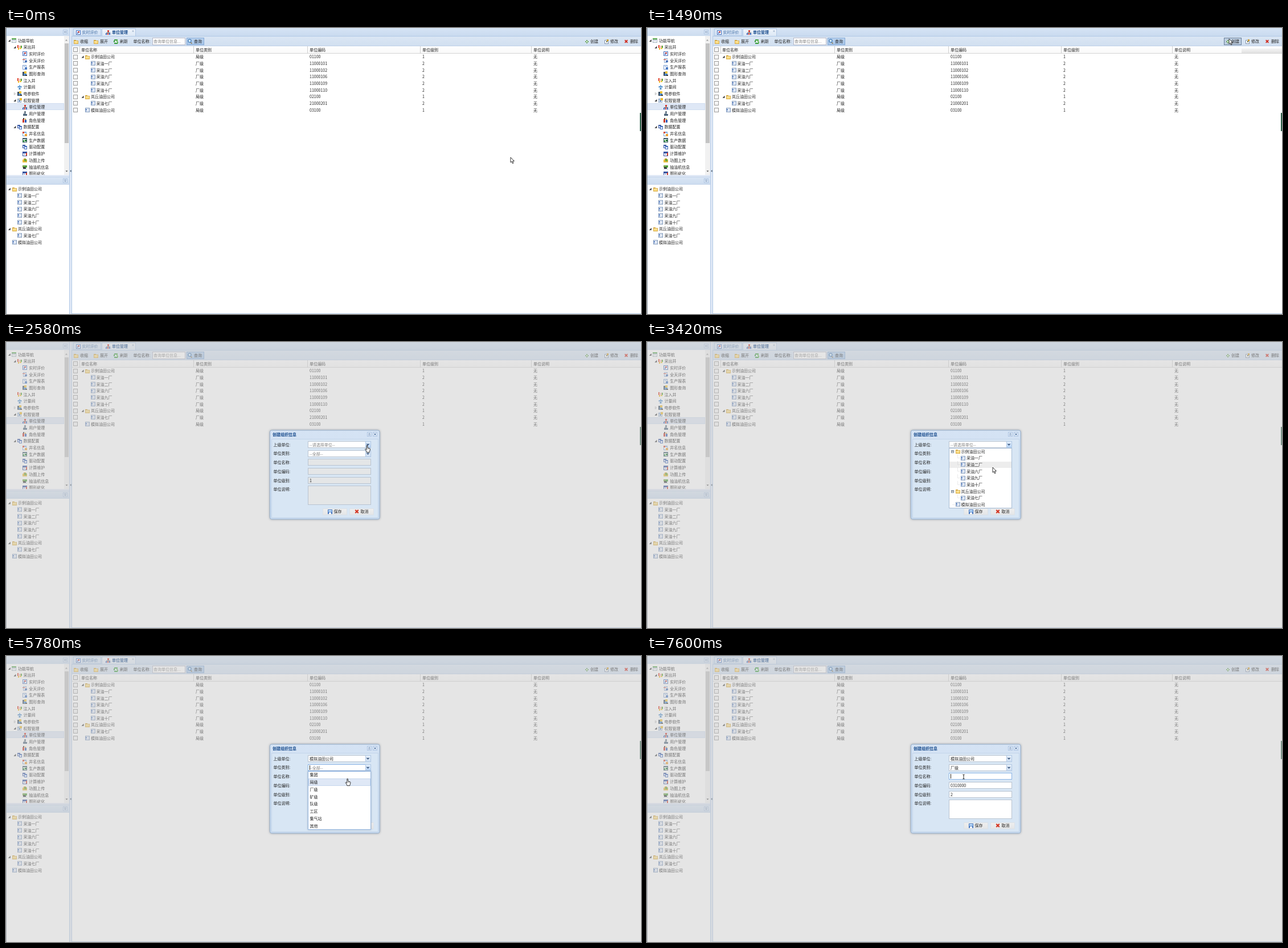
Write an HTML page with a canvas that moves like this. It is 1115 px wide and 502 px high and loops after 8 s.

```html
<!DOCTYPE html>
<html lang="zh-CN">
<head>
<meta charset="utf-8">
<title>单位管理</title>
<style>
html, body { margin: 0; width: 100%; height: 100%; overflow: hidden; background: #fff; }
canvas { display: block; width: 1115px; height: 502px; }
</style>
</head>
<body>
<canvas id="stage" width="1115" height="502"></canvas>
<script>
const W = 1115, H = 502, LOOP = 8000, ROW = 11.68;
const g = document.getElementById('stage').getContext('2d');
const FONT = '"Noto Sans CJK SC", "Noto Sans CJK JP", "Noto Sans CJK", sans-serif';
const INK = '#222', BLUE = '#15498b', LINE = '#b3cae6';

// Each icon: "colour x y w h" blocks on an 8 x 8 grid.
const ICONS = {
  nav: '#9fb0bb 0 0 8 8;#fff 1 3 6 4;#58ab4e 0 0 8 2;#a9b9c5 2 4 4 1',
  well: '#e03a22 0 0 2 5;#f3b51b 1 5 2 3;#dd4b25 4 1 1 4;#4ea22c 6 1 2 4;#f2cf34 4 5 3 2',
  live: '#4a72bb 0 0 8 8;#eef4ff 1 1 6 6;#d23a2f 3 2 3 2;#4773ca 2 4 2 2',
  day: '#8eaad0 1 0 6 8;#fff 2 1 4 6;#d44535 0 2 5 1;#4d74bb 4 4 4 3',
  report: '#7f9fd0 0 0 7 8;#fff 1 1 5 6;#78a7e3 2 2 3 1;#4a7ac5 4 4 4 4',
  query: '#3b4d5e 0 1 5 7;#f3c338 3 0 4 4;#4d91d6 2 4 5 3;#333 5 6 3 2',
  house: '#7db3df 3 0 2 2;#69a3d8 1 2 6 2;#4c88c7 0 3 8 1;#c9e4f8 1 4 6 4;#4784bd 3 5 2 3',
  right: '#8ba6c7 0 1 7 7;#fff 1 3 5 4;#ecbb30 4 0 4 4;#3f70b4 2 4 3 2',
  org: '#d63a2f 3 0 3 3;#666 4 3 1 2;#666 1 4 7 1;#3c62b8 0 5 2 3;#d63a2f 3 5 2 3;#3c62b8 6 5 2 3',
  user: '#6f7f8d 3 0 3 3;#8797a5 2 3 4 2;#4a637a 1 5 7 3',
  role: '#333 1 0 2 2;#c8392c 0 2 3 6;#e1b13a 4 1 2 2;#2f5ab4 4 3 3 5',
  config: '#3a59a3 0 0 5 6;#d9e6fb 1 2 3 3;#3f69bb 3 2 5 6;#eef4ff 4 4 3 3',
  name: '#7aa6da 0 0 7 8;#fff 1 2 5 5;#dc4b30 0 0 3 3;#f0a233 4 4 4 4',
  data: '#3b5869 0 0 8 8;#e6f2e6 1 2 6 5;#3da347 1 4 2 3;#257a35 4 3 3 3',
  calc: '#3553a1 0 0 8 8;#fff 1 3 5 4;#cf3a2b 6 2 2 5;#7892c9 2 4 3 1',
  upload: '#e8bc3c 0 3 8 5;#d99f28 2 1 4 3;#6da737 3 2 4 4',
  pump: '#77a94a 0 1 8 4;#333 1 4 5 3;#3d9a3e 4 2 3 3;#b5c1c9 0 7 8 1',
  folder: '#cfa23a 0 1 4 2;#d9ad4a 0 2 8 6;#f9dc83 1 3 6 4;#fff0b8 1 3 6 1',
  leaf: '#849cbd 0 0 8 8;#f7faff 1 1 6 6;#4a74bb 1 2 2 2;#a9bcd8 4 2 3 1;#4a74bb 1 5 2 1;#a9bcd8 4 5 3 1',
  fresh: '#3a9c3c 1 0 6 2;#3a9c3c 0 2 2 3;#66b956 5 1 2 3;#3a9c3c 1 6 6 2;#66b956 6 4 2 3;#dff2d8 3 3 2 2',
  plus: '#6ea564 3 1 2 6;#6ea564 1 3 6 2;#e5f6dc 3 3 2 2',
  edit: '#8394ad 0 1 7 7;#fff 1 2 5 5;#d29c28 4 0 3 3;#4d5b36 3 3 2 2',
  save: '#4576bf 0 0 8 8;#b9d8f7 1 1 6 3;#f3f8ff 2 5 4 3'
};

const NAV = [
  [0, 'nav', '功能导航', 1], [1, 'well', '采出井', 1], [2, 'live', '实时评价'],
  [2, 'day', '全天评价'], [2, 'report', '生产报表'], [2, 'query', '图形查询'],
  [1, 'well', '注入井'], [1, 'house', '计量间'], [1, 'query', '电参软件', 2],
  [1, 'right', '权限管理', 1], [2, 'org', '单位管理'], [2, 'user', '用户管理'],
  [2, 'role', '角色管理'], [1, 'config', '数据配置', 1], [2, 'name', '井名信息'],
  [2, 'data', '生产数据'], [2, 'config', '驱动配置'], [2, 'calc', '计算维护'],
  [2, 'upload', '功图上传'], [2, 'pump', '抽油机信息'], [2, 'calc', '图形优化']
];
const UNITS = [
  [0, '示例油田公司', '01100', 1], [1, '采油一厂', '11000101'], [1, '采油二厂', '11000102'],
  [1, '采油六厂', '11000106'], [1, '采油九厂', '11000109'], [1, '采油十厂', '11000110'],
  [0, '岚丘油田公司', '02100', 1], [1, '采油七厂', '21000201'], [0, '模拟油田公司', '03100']
];
const KINDS = ['集团', '局级', '厂级', '矿级', '队级', '工区', '集气站', '其他'];

// Pointer moves: start, end, steps, target x, target y.
const MOVES = [
  [500, 1490, 8, 1022, 19], [1890, 2580, 6, 634, 181], [3420, 3420, 1, 607, 220],
  [3560, 4410, 7, 596, 284], [4560, 4950, 4, 632, 196], [5260, 6400, 9, 559, 239],
  [6800, 7450, 6, 556, 212]
];
const T = { press: 1490, dialog: 1610, tree: 2860, picked: 4560, kinds: 5260, chosen: 6800, focus: 7450 };

function rect(x, y, w, h, fill, stroke) {
  if (fill) { g.fillStyle = fill; g.fillRect(x, y, w, h); }
  if (stroke) { g.strokeStyle = stroke; g.lineWidth = 1; g.strokeRect(x + .5, y + .5, w - 1, h - 1); }
}
function fade(y, h, top, bottom) {
  const f = g.createLinearGradient(0, y, 0, y + h);
  f.addColorStop(0, top);
  f.addColorStop(1, bottom);
  return f;
}
function text(s, x, y, color = INK, bold = false) {
  g.font = (bold ? 'bold ' : '') + '7px ' + FONT;
  g.fillStyle = color;
  g.fillText(s, x, y + 2.6);
}
function icon(name, cx, cy) {
  const x = Math.round(cx - 4), y = Math.round(cy - 4);
  for (const part of ICONS[name].split(';')) {
    const [c, ...b] = part.split(' ');
    rect(x + +b[0], y + +b[1], +b[2], +b[3], c);
  }
}
function poly(points, fill, stroke, width = .8) {
  g.beginPath();
  points.forEach(([x, y]) => g.lineTo(x, y));
  g.closePath();
  if (fill) { g.fillStyle = fill; g.fill(); }
  if (stroke) { g.strokeStyle = stroke; g.lineWidth = width; g.stroke(); }
}
function line(points, color, width = 1) {
  g.beginPath();
  points.forEach(([x, y], i) => i ? g.lineTo(x, y) : g.moveTo(x, y));
  g.strokeStyle = color;
  g.lineWidth = width;
  g.stroke();
}
function cross(x, y, r, color, width) {
  line([[x - r, y - r], [x + r, y + r]], color, width);
  line([[x + r, y - r], [x - r, y + r]], color, width);
}
function expander(x, y, state) {
  if (state === 1) poly([[x + 2, y - 2], [x + 2, y + 2], [x - 2, y + 2]], '#333');
  if (state === 2) poly([[x - 1, y - 2], [x + 1.5, y], [x - 1, y + 2]], '#fff', '#999', .6);
}
function down(x, y, color, r = 2) {
  poly([[x - r, y - r / 2], [x + r, y - r / 2], [x, y + r / 2]], color);
}
function tool(x, y, angle) {
  rect(x - 4, y - 4, 8, 8, '#e3edf9', '#adc4e2');
  g.save();
  g.translate(x, y);
  g.rotate(angle);
  for (const d of [-1.7, .7]) line([[d + 1.3, -1.8], [d, 0], [d + 1.3, 1.8]], '#4a6d9c', .8);
  g.restore();
}

function sidebar() {
  rect(0, 0, 112, 14, fade(0, 14, '#dae6f5', '#ccdcef'));
  tool(104, 7, 0);
  rect(1, 132, 101, 12, '#dfe8f6', '#d0ddef');
  g.save();
  g.beginPath();
  g.rect(0, 14, 102, 244);
  g.clip();
  NAV.forEach(([level, pic, label, open], i) => {
    const y = 22 + i * ROW, x = level * 9.6;
    expander(5.8 + x, y, open);
    icon(pic, 14 + x, y);
    text(label, 21 + x, y);
  });
  g.restore();
  rect(102, 14, 9, 244, '#f1f1f1');
  rect(103, 27, 7, 175, '#c3c3c3');
  poly([[104, 22.5], [108, 22.5], [106, 20]], '#9a9a9a');
  down(106.5, 251.5, '#444');
  down(56, 257, '#555', 1.6);
  rect(0, 258, 112, 3, '#dfe8f6');
  rect(0, 261, 112, 14, fade(261, 14, '#dae6f5', '#ccdcef'), '#c2d3e9');
  tool(104, 268, -Math.PI / 2);
  UNITS.forEach(([level, label, , open], i) => {
    const y = 282.6 + i * ROW, x = level * 9.5;
    expander(5.8, y, open);
    icon(open ? 'folder' : 'leaf', 14.5 + x, y);
    text(label, 21 + x, y);
  });
  rect(0, 0, 1, H, '#8d9ba8');
  rect(111, 0, 1, H, LINE);
  rect(112, 0, 3, H, '#dfe8f6');
  poly([[114.5, 249], [114.5, 253], [112.3, 251]], '#456');
}

function toolbar(pressed) {
  rect(115, 15, 1000, 17, fade(15, 17, '#dae6f4', '#d1dff0'));
  rect(115, 31, 1000, 1, '#bfd1e8');
  icon('folder', 123, 23.5);
  text('收缩', 130, 23.5);
  icon('folder', 157.5, 23.5);
  text('展开', 165, 23.5);
  icon('fresh', 193, 23.5);
  text('刷新', 200, 23.5);
  text('单位名称:', 223.5, 23.5);
  rect(257, 17, 58, 13, '#fff', '#b5b8c8');
  text('查询单位信息...', 259, 23.5, '#858585');
  rect(317, 17, 31, 13, fade(17, 13, '#bcd4ef', '#a5c4e8'), '#82a8d6');
  line([[324, 25], [326.5, 27.5]], '#8c7140', 1.3);
  g.beginPath();
  g.arc(322.5, 22.5, 2.6, 0, 7);
  g.fillStyle = '#d8eeff';
  g.fill();
  g.strokeStyle = '#487fb9';
  g.stroke();
  text('查询', 330, 23.5);
  if (pressed) rect(1013, 17, 31, 13, '#bdcde0', '#687f9b');
  icon('plus', 1019.5, 24);
  text('创建', 1026, 23.5);
  icon('edit', 1054.5, 23.5);
  text('修改', 1061, 23.5);
  cross(1089, 23.5, 2.3, '#d02a1c', 1.8);
  text('删除', 1096, 23.5);
}

function checkbox(y) {
  rect(118, Math.round(y - 4), 8, 8, '#f6f6f6', '#9b9b9b');
}

function grid(pressed) {
  rect(115, 0, 1000, 14, fade(0, 14, '#d6e4f5', '#c9daef'));
  rect(118, 1, 49, 13, fade(1, 13, '#dfeaf8', '#cfdff3'), '#b0c8e6');
  rect(168, 1, 60, 14, fade(1, 14, '#f1f6fd', '#dae6f4'), '#b0c8e6');
  rect(115, 14, 53, 1, LINE);
  rect(228, 14, 887, 1, LINE);
  icon('live', 127, 7.5);
  text('实时评价', 133.5, 7.5, '#416da3');
  icon('org', 179, 7.5);
  text('单位管理', 186, 7.5, BLUE, true);
  cross(223, 5.5, 1.4, '#8199b7', .8);
  toolbar(pressed);
  rect(115, 32, 1000, 13, fade(32, 13, '#fff', '#f8f8f8'));
  if (pressed) rect(1044, 36, 71, 9, fade(36, 9, '#f4f4f4', '#dfdfdf'));
  rect(115, 44, 1000, 1, '#d5d5d5');
  [129, 329, 529, 727, 922].forEach(x => rect(x, 32, 1, 13, '#cfcfcf'));
  const cols = [132, 333, 533, 731, 926];
  ['名称', '类别', '编码', '级别', '说明'].forEach((s, i) => text('单位' + s, cols[i], 38));
  checkbox(38);
  UNITS.forEach(([level, label, code, open], i) => {
    const y = 50.6 + i * ROW, x = level * 9.6;
    checkbox(y);
    expander(134.5, y, open);
    icon(open ? 'folder' : 'leaf', 143 + x, y);
    text(label, 149 + x, y);
    [level ? '厂级' : '局级', code, level + 1, '无'].forEach((s, j) => text(s, cols[j + 1], y));
  });
  rect(115, 15, 1, H - 15, LINE);
  rect(115, 501, 1000, 1, LINE);
  rect(1113, 149, 2, 32, '#2e6149');
}

function field(y, h, value, { dull, hint, combo, hot, focus } = {}) {
  rect(530, y, 111, h, dull ? '#e4e6e7' : '#fff', focus ? '#8ab4e6' : '#b9c4d1');
  if (value) text(value, 533, y + 6.3, hint ? '#808080' : INK);
  if (combo) {
    rect(631, y, 10, h, fade(y, h, '#eaf2fb', hot ? '#afcff5' : '#cbdcf0'), '#b0c7e3');
    line([[633.5, y + 4.8], [635.5, y + 6.8], [637.5, y + 4.8]], '#2c4a74', 1.4);
  }
  if (focus) rect(533, y + 2, 1, h - 4, '#222');
}

function button(x, label) {
  rect(x, 292, 43, 12, fade(292, 12, '#efefef', '#e3e5e7'), '#dbe1e7');
  text(label, x + 19.5, 297.8);
}

function treeList(py) {
  rect(530, 186, 111, 106, '#fff', '#a9bdd5');
  UNITS.forEach(([level, label, , open], i) => {
    const y = 192 + i * ROW, x = level * 9.5;
    if (py >= y - 5.2 && py < y + 6.5) rect(531, Math.round(y - 5.5), 109, 11, '#ededed');
    g.setLineDash([1, 1]);
    if (level) line([[545.5, y - 6], [545.5, y], [550, y]], '#c3c3c3', .7);
    else line([[536.5, y], [541, y]], '#c3c3c3', .7);
    g.setLineDash([]);
    if (open) {
      rect(534, Math.round(y - 2.5), 5, 5, '#fff', '#8294a9');
      line([[535, y], [538, y]], '#333', .8);
    }
    icon(open ? 'folder' : 'leaf', 545.5 + x, y);
    text(label, 551.5 + x, y);
  });
}

function kindList(py) {
  g.save();
  g.shadowColor = 'rgba(60,80,110,.4)';
  g.shadowBlur = 3;
  rect(530, 202, 111, 103, '#fff');
  g.restore();
  rect(530, 202, 111, 103, null, '#98b9e2');
  KINDS.forEach((s, i) => {
    const y = 208.5 + i * 12.8;
    if (py >= y - 6.4 && py < y + 6.4) rect(531, Math.round(y - 6.4), 109, 13, '#dfe8f6', '#c6d6ec');
    text(s, 533.5, y);
  });
}

function dialog(t, p) {
  g.save();
  g.shadowColor = 'rgba(60,75,95,.6)';
  g.shadowBlur = 4;
  g.beginPath();
  g.roundRect(463.5, 155, 192.5, 156, 3);
  g.fillStyle = fade(155, 157, '#d5e3f4', '#c9dbef');
  g.fill();
  g.restore();
  g.strokeStyle = '#9ab3d0';
  g.lineWidth = 1;
  g.stroke();
  rect(466, 170, 188, 139, '#d8e6f4', '#c3d5ea');
  text('创建组织信息', 468, 162.3, BLUE, true);
  tool(638, 162, Math.PI / 2);
  rect(644, 158, 8, 8, '#e3edf9', '#adc4e2');
  cross(648, 162, 1.7, '#4a6d9c', 1);
  ['上级单位', '单位类别', '单位名称', '单位编码', '单位级别', '单位说明']
    .forEach((s, i) => text(s + ':', 469.5, 180 + i * 15.75));

  const picked = t >= T.picked, chosen = t >= T.chosen;
  const listing = t >= T.kinds && !chosen;
  const dullTop = t < 1890, dull = t < T.tree;
  field(174, 12, picked ? UNITS[8][1] : '--请选择单位--',
    { combo: true, hint: !picked, dull: dullTop, hot: t >= 2580 && t < T.picked });
  field(190, 12, chosen ? KINDS[2] : '--全部--',
    { combo: true, hint: !chosen, dull: dullTop, hot: t >= 4950 && !chosen, focus: listing });
  field(205, 12, '', { dull, focus: t >= T.focus });
  field(221, 12, chosen ? '0310000' : '', { dull });
  field(237, 12, chosen ? '2' : '1', { dull });
  field(252, 34, '', { dull });
  button(556, '保存');
  icon('save', 568.5, 297.5);
  button(603, '取消');
  cross(616, 297.5, 2.7, '#d43522', 2.2);
  if (t >= T.tree && !picked) treeList(p.y);
  if (listing) kindList(p.y);
}

function pointer(t) {
  let x = 886, y = 227;
  for (const [a, b, n, tx, ty] of MOVES) {
    if (t < a) break;
    const i = b > a ? Math.floor((t - a) / (b - a) * (n - 1) + 1e-6) + 1 : n;
    const k = Math.min(1, i / n);
    x += (tx - x) * k;
    y += (ty - y) * k;
  }
  return { x, y };
}

function cursor(t, { x, y }) {
  g.save();
  g.translate(x, y);
  if (t >= 7060) {
    line([[-1.7, -4], [0, -3.4], [1.7, -4]], '#111', .9);
    line([[0, -3.5], [0, 3.5]], '#111', .9);
    line([[-1.7, 4], [0, 3.4], [1.7, 4]], '#111', .9);
  } else if (t >= 2580 && t < 3420 || t >= 4950) {
    poly([[-.7, .5], [.7, .5], [1.2, 5], [4.7, 5.7], [5.5, 7], [4.6, 10.5], [4.2, 12.5],
      [-.6, 12.5], [-1.4, 10], [-3.5, 7.3], [-2.7, 6.4], [-.8, 8]], '#fff', '#222', .9);
    line([[1.4, 5.6], [1.4, 7.5]], '#444', .5);
    line([[3, 5.8], [3, 7.5]], '#444', .5);
  } else {
    poly([[0, 0], [0, 9], [2, 7.2], [3.5, 10.8], [5, 10.1], [3.6, 6.7], [6.4, 6.5]], '#fff', '#222', .9);
  }
  g.restore();
}

function draw(t) {
  const p = pointer(t), pressed = t >= T.press && t < T.dialog;
  rect(0, 0, W, H, '#fff');
  sidebar();
  grid(pressed);
  if (t >= T.dialog) {
    rect(0, 0, W, H, 'rgba(204,204,204,.5)');
    dialog(t, p);
  }
  cursor(t, p);
}

const start = performance.now();
function frame() {
  draw((performance.now() - start) % LOOP);
  requestAnimationFrame(frame);
}
frame();
</script>
</body>
</html>
```
